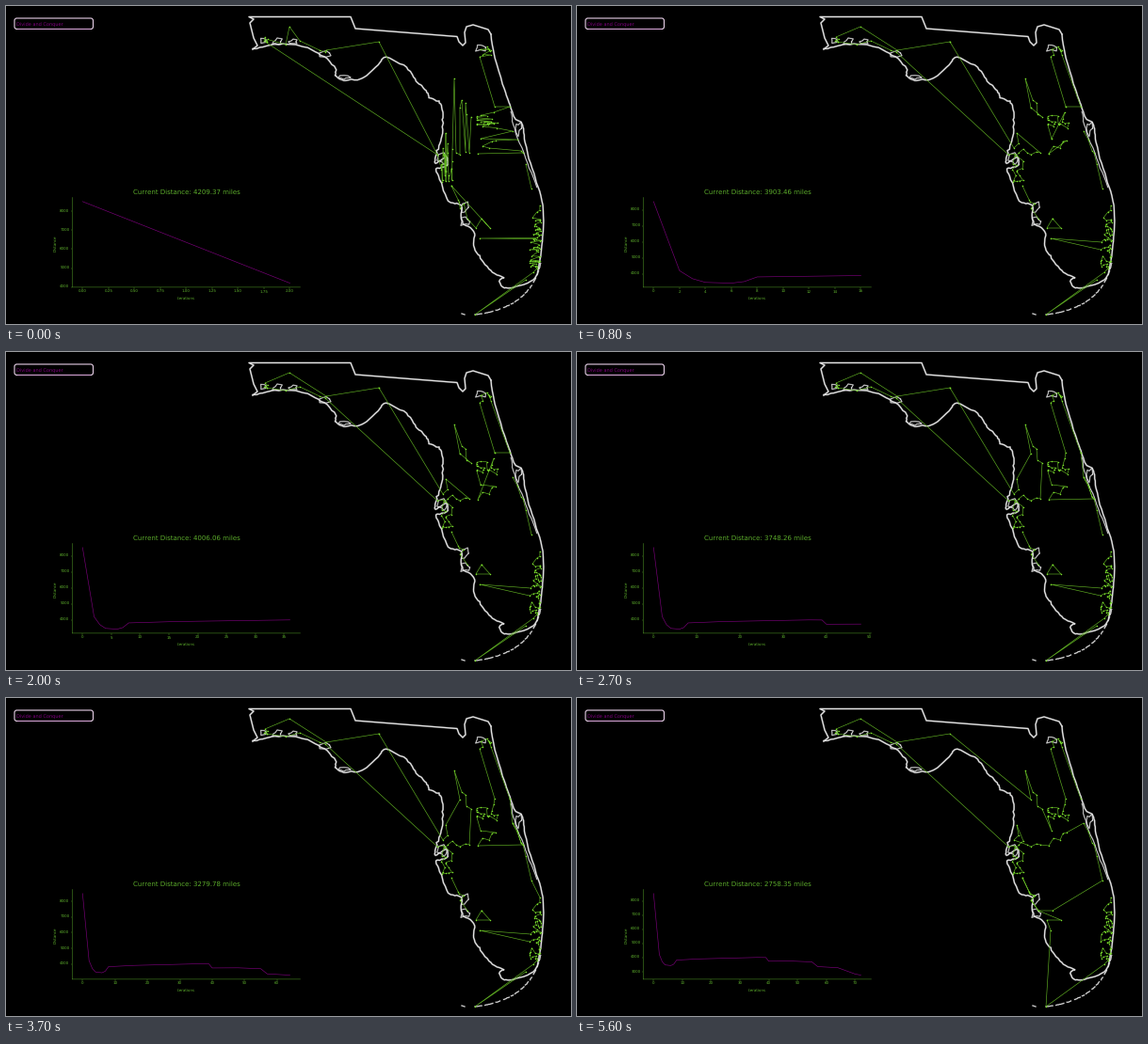
A matplotlib script for the animation above (5.7 s loop, 600 px wide and 338 px high).

```python
import numpy as np
import matplotlib.pyplot as plt
from matplotlib.animation import FuncAnimation
from matplotlib.patches import FancyBboxPatch
from matplotlib.ticker import MaxNLocator

W, H, DPI = 600, 338, 100
FRAMES, STEP = 57, 100
PT = 72 / DPI
LINE, DOT, GREEN, PURPLE = "#5fae22", "#7be02c", "#5dae2c", "#800080"
rng = np.random.default_rng(4)
plt.rcParams.update({"font.family": "DejaVu Sans", "text.hinting": "none",
                     "text.hinting_factor": 1})


def pts(text):
    return np.array([p.split(",") for p in text.split()], float)


# ---- cities and tours

def untangle(p):
    """Nearest neighbour, then two-opt, with both ends fixed."""
    rest, order = list(p[1:-1]), [p[0]]
    while rest:
        d = [np.hypot(*(q - order[-1])) for q in rest]
        order.append(rest.pop(int(np.argmin(d))))
    p = np.array(order + [p[-1]])
    dist = lambda a, b: np.hypot(*(p[a] - p[b]))
    for _ in range(6):
        for i in range(1, len(p) - 2):
            for j in range(i + 1, len(p) - 1):
                old = dist(i - 1, i) + dist(j, j + 1)
                if dist(i - 1, j) + dist(i, j + 1) < old - 1e-6:
                    p[i:j + 1] = p[i:j + 1][::-1]
    return p


def town(first, n, box, last):
    """A good walk through n random cities in a box, between two ends."""
    x0, y0, x1, y1 = box
    return untangle(np.vstack([first, rng.uniform((x0, y0), (x1, y1), (n, 2)),
                               last]))


CITY = {
    "P": np.vstack([pts("396,38 340,47 301,22"),
                    town((275,33), 6, (268, 35, 278, 41), (297, 41)),
                    pts("312,37 333,47 339,49")]),
    "T": town((458, 158), 18, (460, 151, 474, 188), (474, 152)),
    "D": pts("478,156 482,158 488,155 492,156"),
    "Q": pts("467,135 469,146 464,151"),
    "C": pts("482,108 476,77 484,100 488,103 489,115 494,118"),
    "J": np.vstack([pts("519,107"),
                    town((503, 54), 8, (498, 43, 515, 52), (515, 52)),
                    pts("535,107")]),
    "O": town((504, 141), 20, (498, 115, 524, 131), (518, 113)),
    "L": pts("501,157 506,149 513,151 516,144 520,143"),
    "E": pts("538,133 543,142 547,154 549,156"),
    "B": pts("552,168 558,194"),
    "S": town((473, 191), 4, (478, 200, 489, 220), (490, 226)),
    "F": pts("505,226"),
    "G": pts("514,236 499,236"),
    "W": pts("503,247"),
    "K": pts("498,328"),
    "Y": pts("552,291"),
    "M": town((567, 212), 28, (559, 215, 569, 250), (557, 251)),
    "Z": town((556, 259), 24, (556, 253, 567, 280), (560, 283)),
}

# Letters chain clusters, lower case runs one backwards, a dot closes the loop.
PLANS = [
    (1, "PTDQ. C. J. O. L. EB S FG. MWZKY"),
    (13, "PTDQ. C. J. OL. EB S FG. MWZKY"),
    (22, "PTDcQ. jole. EB S FG. MWZKY"),
    (32, "PTDcQ. jole. EBMWZKY S FG."),
    (41, "jocPTQDLEBFs ZKWmGs"),
    (46, "jocPTQDLEBFs MZKWgs"),
]


def by_axis(names, axis):
    p = np.vstack([CITY[k] for k in names])
    return p[np.argsort(p[:, axis], kind="stable")]


def cluster(key, mix):
    """Cities of a cluster, between sorted order (0) and a good walk (1)."""
    p = CITY[key.upper()]
    axis = 0 if key.upper() in "PTDQCSFG" else 1
    rank = np.argsort(np.argsort(p[:, axis], kind="stable"))
    order = (1 - mix) * rank + mix * np.arange(len(p))
    p = p[np.argsort(order, kind="stable")]
    return p[::-1] if key.islower() else p


def close(p):
    return np.vstack([p, p[:1]])


def route(i):
    if i == 0:
        paths = [np.vstack([CITY["T"][:1], by_axis("PTDQC", 0)]),
                 by_axis("JOLE", 1), CITY["B"], close(by_axis("SFG", 0)),
                 np.vstack([by_axis("MZW", 1), CITY["K"], CITY["Y"]])]
    else:
        plan = [p for start, p in PLANS if start <= i][-1]
        paths = []
        for word in plan.split():
            p = np.vstack([cluster(k, min(i / 5, 1)) for k in word.strip(".")])
            paths.append(close(p) if word.endswith(".") else p)
    gap = [[np.nan, np.nan]]
    return np.vstack([q for p in paths for q in (p, gap)])


# ---- map

fig = plt.figure(figsize=(W / DPI, H / DPI), dpi=DPI, facecolor="black")
stage = fig.add_axes([0, 0, 1, 1])
stage.set(xlim=(0, W), ylim=(H, 0))
stage.axis("off")


def spline(p, k=6):
    q = np.vstack([2 * p[0] - p[1], p, 2 * p[-1] - p[-2]])
    a, b, c, d = q[:-3], q[1:-2], q[2:-1], q[3:]
    t = np.linspace(0, 1, k, endpoint=False)[:, None, None]
    s = (2 * b + (c - a) * t + (2 * a - 5 * b + 4 * c - d) * t**2
         + (3 * b - a - 3 * c + d) * t**3) / 2
    return np.vstack([s.transpose(1, 0, 2).reshape(-1, 2), p[-1:]])


def shore(p, rough=0.0, width=1.2):
    p = p + rng.normal(0, rough, p.shape) if rough else p
    stage.plot(*p.T, color="#8c8c8c", lw=(width + 0.8) * PT, alpha=0.6, zorder=1)
    stage.plot(*p.T, color="#e4e4e4", lw=width * PT, zorder=2)


def bay(x, y, rx, ry, n=9):
    """A ragged little shore loop."""
    a = np.linspace(0, 2 * np.pi, n)
    r = rng.uniform(0.3, 1.1, n)
    r[-1] = r[0]
    shore(np.c_[x + rx * r * np.cos(a), y + ry * r * np.sin(a)], width=0.7)


shore(pts("262,46 267,42 263,34 259,18 263,14 258,11.5 366,11.5 371,24 "
          "479,32.5 481,38 485,42 488,39 487,28 489,22 496,20 512,25 515,30"))
shore(spline(pts("515,30 518,50 529,88 535,105 540,119 548,125 550,137 553,153 "
                 "562,183 570,212 570,245 566,275 560,291 539,299 528,299 "
                 "524,292 528,289")), 0.2)
shore(spline(pts("528,289 515,281 504,268 497,255 497,240 484,229 483,212 "
                 "470,207 461,185 457,173 468,170 468,161 456,167 458,154 "
                 "463,138 464,118 462,104 456,100 449,96 444,87 436,80 "
                 "425,65 404,55 397,60 380,76 361,79 350,74 350,66 335,52 "
                 "312,42 285,41 262,46")), 0.4)
shore(spline(pts("536,112 540,130 552,162 564,192")), 0.3, 0.7)

for spot in ((274, 37, 5, 4), (288, 38, 7, 4), (305, 38, 8, 4), (340, 50, 9, 5),
             (359, 76, 7, 3), (465, 164, 8, 9), (487, 214, 5, 9),
             (488, 229, 7, 6), (504, 44, 8, 6), (544, 130, 4, 9)):
    bay(*spot)

# island chain: broken dashes along a curve
t = np.linspace(0, 1, 120)[:, None]
arc = ((1 - t)**2 * (568, 272) + 2 * t * (1 - t) * np.array((558, 322))
       + t**2 * (497, 328))
start = 2
while start < len(arc) - 4:
    size = rng.integers(4, 11)
    shore(arc[start:start + size], 0.15, 0.9)
    start += size + rng.integers(2, 5)
shore(pts("484,327 487,328"), width=0.9)

# label box
stage.add_patch(FancyBboxPatch((11, 15), 79.5, 7.5, fc="black", ec="#ead2ea",
                               lw=1.1 * PT, zorder=3,
                               boxstyle="round,pad=2,rounding_size=2.5"))
stage.plot([12, 89], [23.8, 23.8], color="#c070c0", lw=0.5 * PT, zorder=4)
stage.text(11, 21.2, "Divide and Conquer", color=PURPLE, size=5.5 * PT,
           zorder=4)

tour, = stage.plot([], [], color=LINE, lw=0.65 * PT, marker="o", mfc=DOT,
                   ms=1.5 * PT, mew=0, zorder=5)

# ---- chart

FRAME_KEYS, ITER_KEYS = [0, 8, 20, 27, 37, 43, 48], [2, 16, 36, 48, 64, 70, 72]
HISTORY = pts("0,8510 2,4209.37 3,3710 4,3480 6,3433 7,3530 8,3820 16,3903.46 "
              "36,4006.06 39,4000 40,3740 48,3748.26 55,3690 57,3360 "
              "64,3279.78 70,2835.58 72,2758.35")

title = stage.text(191.5, 200.3, "", color=GREEN, size=6.95 * PT, ha="center")
L, R, T, B = 70.3, 312.5, 203.5, 298.9
chart = fig.add_axes([L / W, 1 - B / H, (R - L) / W, (B - T) / H],
                     facecolor="none")
for side, spine in chart.spines.items():
    spine.set(color=GREEN, linewidth=0.5 * PT, alpha=0.9, snap=False,
              visible=side in ("left", "bottom"))
chart.tick_params(colors=GREEN, labelsize=4.25 * PT, length=1.5 * PT,
                  width=0.4 * PT, pad=1.4 * PT)
for axis in (chart.xaxis, chart.yaxis):
    axis.set_major_locator(MaxNLocator(9, steps=[1, 2, 2.5, 5, 10]))
stage.text(191.5, 311.5, "Iterations", color=GREEN, size=4.4 * PT, ha="center")
stage.text(52.3, 252, "Distance", color=GREEN, size=4.4 * PT, rotation=90,
           ha="center", va="center")
curve, = chart.plot([], [], color=PURPLE, lw=0.6 * PT)


def draw(i):
    last = int(round(np.interp(i, FRAME_KEYS, ITER_KEYS)))
    x = np.arange(last + 1)
    y = np.interp(x, *HISTORY.T)
    curve.set_data(x, y)
    pad = 0.05 * np.ptp(y)
    chart.set_xlim(-0.05 * last, 1.05 * last)
    chart.set_ylim(y.min() - pad, y.max() + pad)
    title.set_text(f"Current Distance: {y[-1]:.2f} miles")
    tour.set_data(*route(i).T)
    return tour, curve, title


anim = FuncAnimation(fig, draw, frames=FRAMES, interval=STEP,
                     init_func=lambda: draw(0), repeat=True, repeat_delay=0)
plt.show()
```
